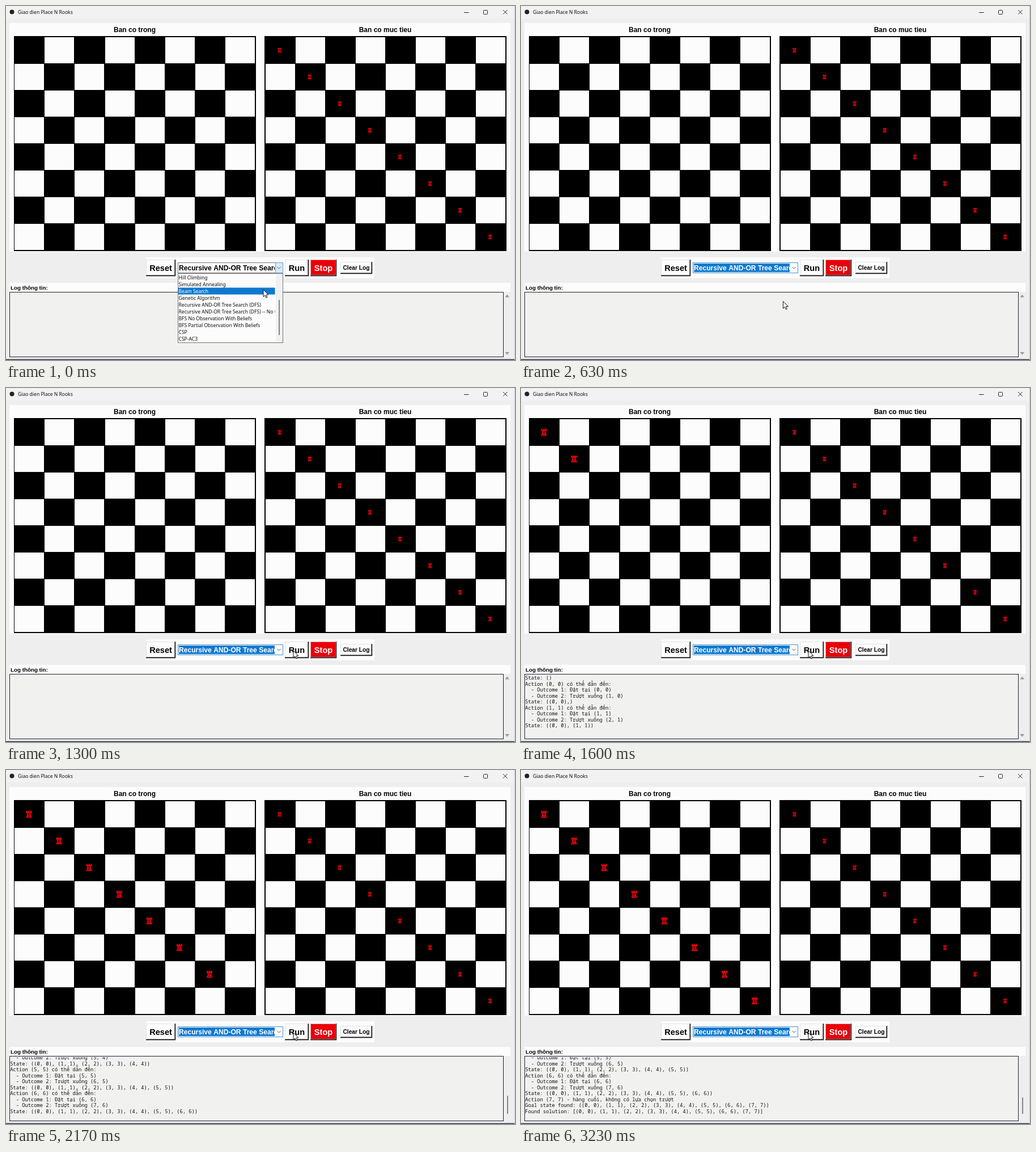
Animation, 898 px wide and 624 px high, one loop 3.26 s. Source, as an HTML page with a canvas:

```html
<!DOCTYPE html>
<html lang="vi">
<head>
<meta charset="utf-8">
<title>Giao dien Place N Rooks</title>
<style>
html, body { margin: 0; width: 100%; height: 100%; overflow: hidden; background: #eee; }
canvas { display: block; }
</style>
</head>
<body>
<canvas id="stage" width="898" height="624"></canvas>
<script>
const ctx = document.getElementById('stage').getContext('2d');
const LOOP = 3260;
const BOLD = '"Liberation Sans", Arial, sans-serif';
const UI = '8.55px "Noto Sans", "Open Sans", sans-serif';
const MONO = '8.75px "Noto Sans Mono", "DejaVu Sans Mono", monospace';
const BG = '#eeeeee', WHITE = '#fcfcfc', BLUE = '#1079cf', RED = '#e9000a';

const MENU_CLOSES = 440, LOG_START = 1390, FIRST_ROOK = 1450, ROOK_GAP = 110;
const ITEMS = [
  'Hill Climbing', 'Simulated Annealing', 'Beam Search', 'Genetic Algorithm',
  'Recursive AND-OR Tree Search (DFS)', 'Recursive AND-OR Tree Search (DFS) -- No Goal',
  'BFS No Observation With Beliefs', 'BFS Partial Observation With Beliefs', 'CSP', 'CSP-AC3'
];
// time, x, y of the pointer tip
const PATH = [[0, 454, 500], [340, 447, 541], [470, 447, 541], [940, 504, 466], [1050, 504, 466], [1250, 507, 463]];

function rect(x, y, w, h, color) {
  ctx.fillStyle = color;
  ctx.fillRect(x, y, w, h);
}

function frame(x, y, w, h, color) {
  ctx.strokeStyle = color;
  ctx.lineWidth = 1;
  ctx.strokeRect(x + .5, y + .5, w - 1, h - 1);
}

function text(s, x, y, font, color = '#000', align = 'left') {
  ctx.font = font;
  ctx.fillStyle = color;
  ctx.textAlign = align;
  ctx.fillText(s, x, y);
}

function line(points, color, width = 1) {
  ctx.strokeStyle = color;
  ctx.lineWidth = width;
  ctx.beginPath();
  points.forEach(([x, y]) => ctx.lineTo(x, y));
  ctx.stroke();
}

function clipped(x, y, w, h, draw) {
  ctx.save();
  ctx.beginPath();
  ctx.rect(x, y, w, h);
  ctx.clip();
  draw();
  ctx.restore();
}

const bold = size => `bold ${size}px ${BOLD}`;

function pointerAt(t) {
  for (let i = 1; i < PATH.length; i++) {
    const [t0, x0, y0] = PATH[i - 1], [t1, x1, y1] = PATH[i];
    if (t < t1) {
      const p = (t - t0) / (t1 - t0), e = p * p * (3 - 2 * p);
      return [x0 + (x1 - x0) * e, y0 + (y1 - y0) * e];
    }
  }
  return PATH[PATH.length - 1].slice(1);
}

function drawWindow() {
  rect(0, 0, 898, 624, BG);
  rect(0, 0, 898, 22, '#f2f2f2');
  ctx.fillStyle = '#222';
  ctx.beginPath();
  ctx.arc(10.5, 10.5, 4, 0, 7);
  ctx.fill();
  text('Giao dien Place N Rooks', 21, 14, UI, '#111');
  line([[808, 11.5], [816.5, 11.5]], '#222');
  ctx.lineWidth = 1;
  ctx.strokeStyle = '#222';
  ctx.beginPath();
  ctx.roundRect(842.5, 7.5, 7, 7, 1);
  ctx.stroke();
  line([[877, 7], [884.5, 14.5]], '#222');
  line([[884.5, 7], [877, 14.5]], '#222');
  rect(6, 30, 884, 403, WHITE);
  rect(247, 443, 403, 37, WHITE);
  rect(6, 488, 884, 16, WHITE);
  rect(0, 622.5, 898, 1.5, '#343b50');
  rect(897, 0, 1, 624, '#c4c7ce');
}

function drawBoard(left, firstCol, pitch, title, mid) {
  text(title, mid, 46, bold(12), '#000', 'center');
  rect(left, 53, 427, 379, '#000');
  for (let r = 0; r < 8; r++)
    for (let c = 0; c < 8; c++)
      if ((r + c) % 2) rect(Math.round(firstCol + pitch * c), 55 + 47 * r, 52, 46, WHITE);
}

function drawRook(i, left, w, h) {
  const x = left + 53.1 * i, y = 78 + 47 * i;
  ctx.save();
  ctx.translate(x, y);
  ctx.scale(w / 10, h / 12);
  ctx.fillStyle = '#f4000c';
  ctx.fillRect(-5, -6, 2.6, 3);
  ctx.fillRect(-1.4, -6, 2.8, 3);
  ctx.fillRect(2.4, -6, 2.6, 3);
  ctx.fillRect(-4.6, -4, 9.2, 2);
  ctx.fillRect(-3.4, -2, 6.8, 5);
  ctx.fillRect(-4.4, 2.6, 8.8, 1.8);
  ctx.fillRect(-5, 4.2, 10, 1.8);
  ctx.fillStyle = '#300';
  ctx.fillRect(-2.8, -2.4, 5.6, .8);
  ctx.fillRect(-1.8, -.4, 3.6, 1.8);
  ctx.fillRect(-3, 3.2, 6, .8);
  ctx.restore();
}

function drawButton(label, x, y, w, h, size, fill = WHITE, color = '#000') {
  rect(x, y, w, h, fill);
  line([[x + .5, y + h], [x + .5, y + .5], [x + w, y + .5]], fill === WHITE ? '#e2e2e2' : '#f7a0a0');
  line([[x + 1, y + h - 1.5], [x + w - 1.5, y + h - 1.5], [x + w - 1.5, y + 1]], '#999');
  line([[x, y + h - .5], [x + w - .5, y + h - .5], [x + w - .5, y]], '#111', 1.4);
  text(label, x + w / 2, y + h / 2 + size * .36, bold(size), color, 'center');
}

function drawCombo(open) {
  rect(303, 452, 186, 19, WHITE);
  frame(303, 452, 186, 19, open ? '#777' : '#4a93cf');
  if (open) {
    rect(475, 453, 13, 17, '#d9e9f8');
    frame(475, 452, 14, 19, '#5e9dd3');
  } else {
    rect(305, 454, 169, 15, BLUE);
  }
  clipped(304, 453, 170, 17, () =>
    text('Recursive AND-OR Tree Search (DFS)', 305, 466, bold(12.1), open ? '#000' : '#fff'));
  line([[478.5, 460], [481.5, 463], [484.5, 460]], '#555');
}

function drawMenu(tipY) {
  const row = Math.floor((tipY - 472.5) / 12);
  rect(303, 471, 186, 123, WHITE);
  rect(476, 472, 12, 121, '#f1f1f1');
  frame(303, 471, 186, 123, '#777');
  rect(481, 518, 2, 62, '#858585');
  clipped(304, 472, 170.5, 121, () => ITEMS.forEach((item, i) => {
    if (i === row) rect(304, 472.5 + 12 * i, 171, 12, BLUE);
    text(item, 304.5, 481.7 + 12 * i, UI, i === row ? '#fff' : '#111');
  }));
}

const pair = (r, c) => `(${r}, ${c})`;
const diagonal = n => Array.from({ length: n }, (_, i) => pair(i, i)).join(', ');
const state = n => `State: (${diagonal(n)}${n === 1 ? ',' : ''})`;

function logLines(rooks) {
  const out = [state(0)];
  for (let i = 0; i < Math.min(rooks, 7); i++) {
    out.push(`Action ${pair(i, i)} có thể dẫn đến:`,
      `  - Outcome 1: Đặt tại ${pair(i, i)}`,
      `  - Outcome 2: Trượt xuống ${pair(i + 1, i)}`,
      state(i + 1));
  }
  if (rooks === 8) {
    out.push('Action (7, 7) - hàng cuối, không có lựa chọn trượt',
      `Goal state found: (${diagonal(8)})`,
      `Found solution: [${diagonal(8)}]`);
  }
  return out;
}

function drawLog(t, rooks) {
  text('Log thông tin:', 8, 499.5, bold(9.8));
  rect(6, 504, 872, 115, '#f1f1f0');
  frame(6, 504, 872, 115, '#1f2230');
  const lines = t >= LOG_START ? logLines(rooks) : [];
  const step = 10.52;
  const first = Math.min(514, 615.4 - step * lines.length);
  clipped(7, 506, 870, 112, () =>
    lines.forEach((s, i) => text(s, 7.3, first + step * i, MONO, '#111')));
  if (first < 514) {
    const h = 88 * 10.8 / (lines.length + 1);
    rect(884, 606 - h, 2, h, '#858585');
  } else {
    ctx.fillStyle = '#9a9a9a';
    for (const [y, d] of [[511, -2.5], [612.5, 2.5]]) {
      ctx.beginPath();
      ctx.moveTo(880.5, y - d);
      ctx.lineTo(888, y - d);
      ctx.lineTo(884.25, y + d);
      ctx.fill();
    }
  }
}

function drawPointer(x, y) {
  ctx.save();
  ctx.translate(x, y);
  ctx.beginPath();
  [[0, 0], [0, 12.5], [2.9, 9.8], [4.9, 14.2], [6.9, 13.3], [5, 9], [9, 9]].forEach(([a, b]) => ctx.lineTo(a, b));
  ctx.closePath();
  ctx.fillStyle = '#fff';
  ctx.fill();
  ctx.strokeStyle = '#111';
  ctx.lineWidth = 1;
  ctx.stroke();
  ctx.restore();
}

function draw(t) {
  const open = t < MENU_CLOSES;
  const rooks = Math.max(0, Math.min(8, Math.floor((t - FIRST_ROOK) / ROOK_GAP) + 1));
  const [px, py] = pointerAt(t);
  drawWindow();
  drawBoard(14, 15.2, 53.1, 'Ban co trong', 227);
  drawBoard(456, 457.9, 53.05, 'Ban co muc tieu', 669);
  for (let i = 0; i < 8; i++) {
    drawRook(i, 482.4, 6, 8);
    if (i < rooks) drawRook(i, 40.4, 10, 12);
  }
  drawButton('Reset', 247, 447, 52, 29, 14.6);
  drawButton('Run', 492, 447, 42, 29, 14.6);
  drawButton('Stop', 537, 447, 46, 29, 14.6, RED, '#fff');
  drawButton('Clear Log', 590, 451, 56, 21, 10.2);
  drawLog(t, rooks);
  drawCombo(open);
  if (open) drawMenu(py);
  drawPointer(px, py);
}

const start = performance.now();
function tick() {
  draw((performance.now() - start) % LOOP);
  requestAnimationFrame(tick);
}
tick();
</script>
</body>
</html>
```
